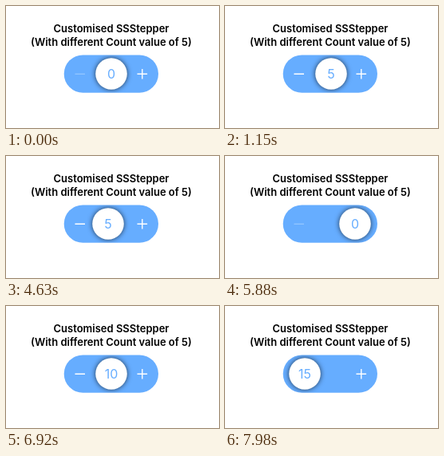
Write an HTML page that moves like this. It is 267 by 153 pixels and loops after 8000 ms.

```html
<!DOCTYPE html>
<html lang="en">
<head>
<meta charset="utf-8">
<style>
  html, body { margin: 0; width: 100%; height: 100%; overflow: hidden; background: #fff; }
  svg { display: block; width: 100%; height: 100%; }
  text { font-family: Inter, Roboto, sans-serif; text-anchor: middle; }
  .title { font-size: 13px; font-weight: 600; }
  #count { font-size: 16px; fill: #66adff; }
  .sign { stroke: #fff; stroke-width: 1.4; }
  .disc { fill: #fff; filter: drop-shadow(0 0 3px rgba(0, 0, 0, .7)); }
</style>
</head>
<body>
<svg viewBox="0 0 267 153">
  <clipPath id="pill"><rect x="72.7" y="61.4" width="118.3" height="47.4" rx="23.7"/></clipPath>
  <g class="title">
    <text x="132" y="33.3">Customised SSStepper</text>
    <text x="132" y="50.3">(With different Count value of 5)</text>
  </g>
  <g clip-path="url(#pill)">
    <rect x="72" y="61" width="120" height="48" fill="#66adff"/>
    <path id="minus" class="sign" d="M86.5 85.3h12.5"/>
    <path class="sign" d="M164.5 85.3h12.6M170.8 79v12.6"/>
    <g id="knob">
      <circle class="disc" cy="85" r="19.8"/>
      <text id="count" y="91"></text>
    </g>
  </g>
</svg>
<script>
const LOOP = 8000, STEP = 100;
const [minus, knob, count] = ['minus', 'knob', 'count'].map(id => document.getElementById(id));

// A drag pulls the knob to reach, lets it go back to rest, then shows value
const drags = [
  { at: 0, steps: 0, reach: 132, rest: 132, value: 0 },
  { at: 830, steps: 3, reach: 163, rest: 133, value: 5 },
  { at: 3860, steps: 7, reach: 120, rest: 128, value: 5 },
  { at: 5140, steps: 2, reach: 128, rest: 132, value: 0 },
  { at: 5780, steps: 4, reach: 163, rest: 132, value: 5 },
  { at: 6570, steps: 3, reach: 162, rest: 132, value: 10 },
  { at: 7190, steps: 4, reach: 162, rest: 132, value: 15 },
  { at: 7870, steps: 4, reach: 100, rest: 132, value: 10 }
];

function pose(t) {
  const i = drags.findLastIndex(d => d.at <= t);
  const drag = drags[i], before = drags[i - 1];
  const k = Math.floor((t - drag.at) / STEP);
  if (k >= drag.steps) return [drag.rest, drag.value];
  const way = drag.reach - before.rest;
  const pull = Math.min(Math.abs(way), 8 + 24 * k);
  const release = Math.max(0, k - 1) / (drag.steps - 1);
  const x = before.rest + Math.sign(way) * pull;
  return [x + (drag.rest - x) * release, before.value];
}

const start = performance.now();

function draw() {
  const [x, value] = pose((performance.now() - start) % LOOP);
  knob.setAttribute('transform', `translate(${x} 0)`);
  count.textContent = value;
  minus.setAttribute('opacity', value ? 1 : .28);
  requestAnimationFrame(draw);
}
draw();
</script>
</body>
</html>
```
